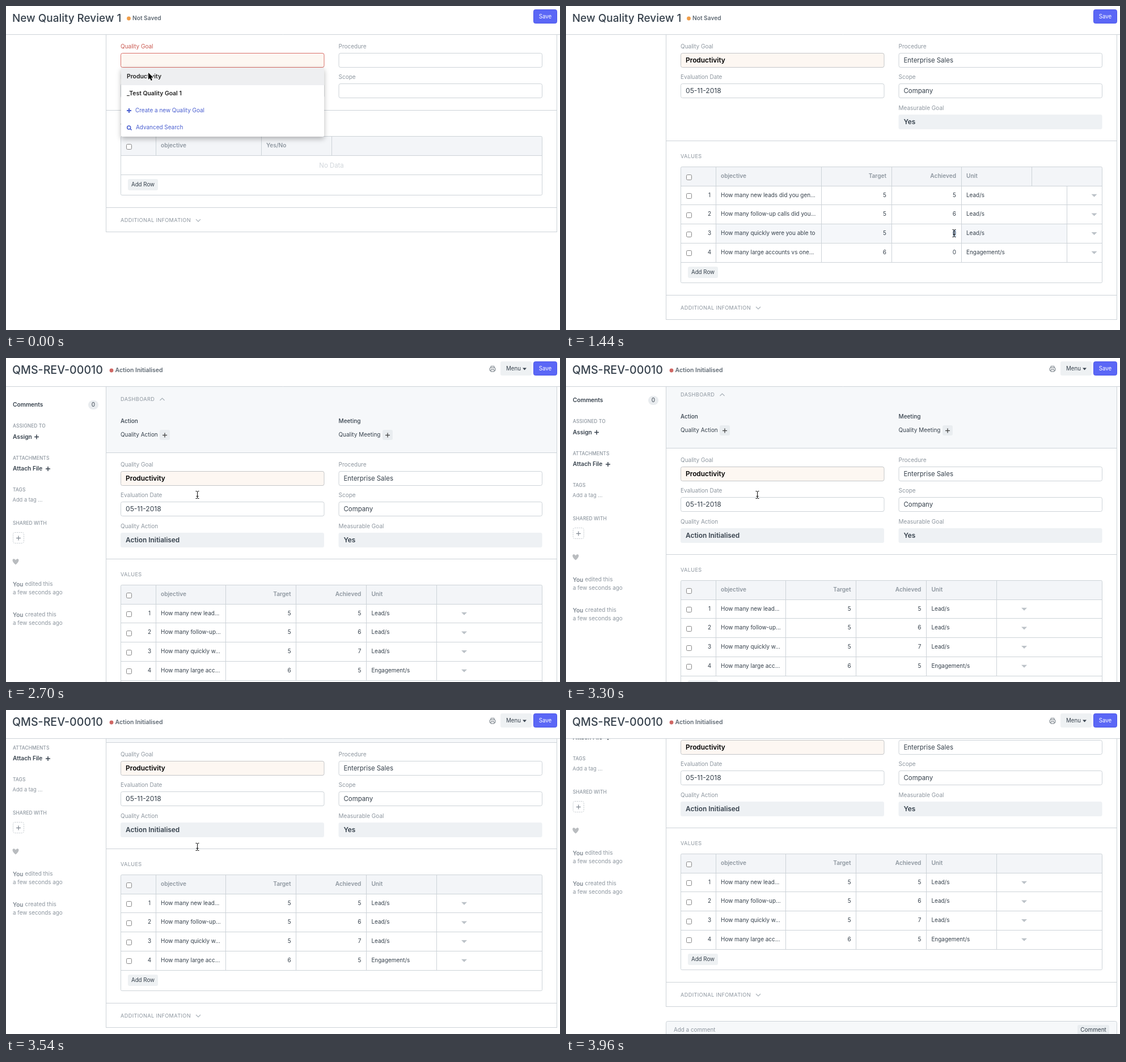
These frames come from a looping animation (977x573 px, 4.02 s). An HTML page with a canvas:

```html
<!DOCTYPE html>
<html lang="en">
<head>
<meta charset="utf-8">
<title>Quality review form</title>
<style>
  html, body { margin: 0; width: 100%; height: 100%; overflow: hidden; background: #fff; }
  canvas { display: block; }
</style>
</head>
<body>
<canvas id="stage" width="977" height="573"></canvas>
<script>
const ctx = document.getElementById('stage').getContext('2d');
const W = 977, H = 573, LOOP = 4020, STEP = 60;
const BORDER = '#cdd3d8', MUTED = '#8d969f', DARK = '#36414c', TINT = '#f3f5f8', BLUE = '#5b67f6';

// Moments when the form changes
const PICK = 120, FILL = 240, PRESS = 2220, SAVED = 2460, POINTER_GONE = 3900;

const ROWS = [
  { q: 'How many new leads did you generate', cut: [30, 17], target: 5, value: 5, unit: 'Lead/s', edit: [660, 780, 960] },
  { q: 'How many follow-up calls did you make', cut: [32, 18], target: 5, value: 6, unit: 'Lead/s', edit: [960, 1140, 1320] },
  { q: 'How many quickly were you able to', cut: [31, 18], target: 5, value: 7, unit: 'Lead/s', edit: [1380, 1560, 1680] },
  { q: 'How many large accounts vs one-off', cut: [30, 18], target: 6, value: 5, unit: 'Engagement/s', edit: [1740, 1860, 1980] },
];

// [time, x, y]
const POINTER = [
  [0, 251, 118], [120, 252, 122], [240, 262, 126], [480, 646, 316], [600, 684, 335],
  [840, 684, 335], [960, 684, 369], [1200, 684, 369], [1380, 684, 402], [1560, 684, 402],
  [1740, 684, 436], [1920, 684, 436], [2220, 956, 21], [2400, 956, 21], [2700, 337, 242],
];
// [time, offset]
const SCROLL = [
  [3120, 0], [3300, 8], [3360, 28], [3420, 58], [3480, 88],
  [3540, 110], [3600, 124], [3720, 138], [3960, 147],
];

const smooth = u => u * u * (3 - 2 * u);

function sample(keys, t, ease = u => u) {
  if (t <= keys[0][0]) return keys[0].slice(1);
  for (let i = 1; i < keys.length; i++) {
    const a = keys[i - 1], b = keys[i];
    if (t <= b[0]) {
      const u = ease((t - a[0]) / (b[0] - a[0]));
      return a.slice(1).map((v, k) => v + (b[k + 1] - v) * u);
    }
  }
  return keys[keys.length - 1].slice(1);
}

function text(s, x, y, { size = 9.95, color = DARK, weight = 400, align = 'left', spacing = 0 } = {}) {
  ctx.font = `${weight} ${size}px Inter, sans-serif`;
  ctx.letterSpacing = spacing + 'px';
  ctx.textAlign = align;
  ctx.textBaseline = 'middle';
  ctx.fillStyle = color;
  ctx.fillText(s, x, y);
}

function box(x, y, w, h, { fill, stroke, r = 0 } = {}) {
  ctx.beginPath();
  ctx.roundRect(x, y, w, h, r);
  if (fill) { ctx.fillStyle = fill; ctx.fill(); }
  if (stroke) { ctx.strokeStyle = stroke; ctx.lineWidth = 1; ctx.stroke(); }
}

function path(points, { stroke, fill, width = 1 }) {
  ctx.beginPath();
  points.forEach(([x, y], i) => i ? ctx.lineTo(x, y) : ctx.moveTo(x, y));
  if (fill) { ctx.closePath(); ctx.fillStyle = fill; ctx.fill(); }
  if (stroke) { ctx.strokeStyle = stroke; ctx.lineWidth = width; ctx.stroke(); }
}

function dot(x, y, r, color) {
  ctx.beginPath();
  ctx.arc(x, y, r, 0, 7);
  ctx.fillStyle = color;
  ctx.fill();
}

const snap = v => Math.floor(v) + 0.5;
const hline = (x1, x2, y) => path([[x1, snap(y)], [x2, snap(y)]], { stroke: BORDER });
const vline = (x, y1, y2) => path([[snap(x), y1], [snap(x), y2]], { stroke: BORDER });
const caret = (x, y, w, h, color) => path([[x - w, y - h], [x + w, y - h], [x, y + h]], { fill: color });
const chevron = (x, y, d) => path([[x - 4, y - 2 * d], [x, y + 2 * d], [x + 4, y - 2 * d]], { stroke: '#a9b1b8', width: 1.2 });
const caption = (s, y) => text(s, 202, y, { size: 9.2, color: MUTED, spacing: 0.35 });
const bold = (s, x, y, o) => text(s, x, y, { size: 10.2, weight: 600, ...o });

function plus(x, y, r, color, width) {
  path([[x - r, y], [x + r, y]], { stroke: color, width });
  path([[x, y - r], [x, y + r]], { stroke: color, width });
}

function field(x, y, label, value, { readOnly, strong, fill = '#fff', stroke = BORDER, size = 11.4, labelColor = MUTED } = {}) {
  text(label, x, y, { size: 10, color: labelColor });
  if (readOnly) box(x, y + 11, 359, 26, { fill: '#eef1f4', r: 3 });
  else box(x + 0.5, y + 11.5, 358.5, 25, { fill, stroke, r: 3 });
  const heavy = strong || readOnly;
  text(value, x + 9, y + 24.5, {
    size: heavy ? 11.9 : size, weight: heavy ? 600 : 400, color: strong ? '#000' : DARK,
  });
}

function fields(y, t) {
  const picked = t >= PICK, filled = t >= FILL, saved = t >= SAVED;
  const focused = picked && t < ROWS[0].edit[0];
  if (focused) box(201, y + 32, 362, 28, { fill: '#e6e6e6', r: 4 });
  field(202, y + 22, 'Quality Goal', picked ? 'Productivity' : '', {
    strong: true, fill: '#fdf7f2',
    stroke: picked ? '#c4c6c8' : '#d9706a', labelColor: picked ? MUTED : '#c9584f',
  });
  if (focused) {
    path([[547, y + 46], [552, y + 46]], { stroke: '#222', width: 3 });
    path([[551, y + 42], [555.5, y + 46], [551, y + 50]], { fill: '#222' });
  }
  field(586.5, y + 22, 'Procedure', filled ? 'Enterprise Sales' : '');
  field(202, y + 76, 'Evaluation Date', '05-11-2018', { size: 12.1 });
  field(586.5, y + 76, 'Scope', filled ? 'Company' : '');
  if (filled) field(586.5, y + 131, 'Measurable Goal', 'Yes', { readOnly: true });
  if (saved) field(202, y + 131, 'Quality Action', 'Action Initialised', { readOnly: true });
}

function checkbox(y) {
  box(212.5, snap(y - 4), 9, 9, { fill: '#fff', stroke: '#858585', r: 2 });
}

function row(i, y, cols, t) {
  const { q, cut, target, value, unit, edit: [start, typed, end] } = ROWS[i];
  const saved = t >= SAVED, editing = t >= start && t < end;
  const mid = y + 16.5, [c1, c2, c3, c4, c5] = cols;
  if (editing) {
    box(c1, y, c5 - c1, 33, { fill: '#f5f7fa' });
    box(c3, y, c4 - c3, 33, { fill: '#fff' });
    if (t < typed) box(682, mid - 6, 6, 12, { fill: '#cfe0f7' });
  }
  checkbox(mid + 1);
  text(i + 1, 253, mid, { align: 'center' });
  ctx.save();
  ctx.beginPath();
  ctx.rect(c1, y, c2 - c1 - 9, 33);
  ctx.clip();
  text(editing ? q : q.slice(0, cut[+saved]) + '...', c1 + 9, mid);
  ctx.restore();
  text(target, c3 - 9, mid, { align: 'right' });
  text(t >= typed ? value : 0, c4 - 9, mid, { align: 'right' });
  text(unit, c4 + 9, mid);
  caret(saved ? 808 : 931.5, mid + 0.5, 5, 2.5, '#bcc2c8');
  cols.forEach(x => vline(x, y, y + 33.7));
}

// Draws the child table and returns its bottom edge
function table(y, t) {
  const filled = t >= FILL, saved = t >= SAVED, pitch = 33.7;
  const heads = saved ? [264, 387.7, 511.6, 635.4, 759.3] : filled ? [264, 450, 574, 697, 821] : [264, 450, 574];
  const cols = saved ? heads : [264, 450, 574, 697, 883];
  const count = filled ? ROWS.length : 1;
  const bottom = y + pitch * (count + 1) + 36;
  const head = { size: 10.1, color: MUTED };
  box(203, y, 742, pitch, { fill: TINT });
  checkbox(y + 17.5);
  heads.forEach(x => vline(x, y, y + pitch));
  bold('objective', 273, y + 16.5, head);
  if (filled) {
    bold('Target', heads[2] - 9, y + 16.5, { ...head, align: 'right' });
    bold('Achieved', heads[3] - 9, y + 16.5, { ...head, align: 'right' });
    bold('Unit', heads[3] + 9, y + 16.5, head);
    ROWS.forEach((_, i) => row(i, y + pitch * (i + 1), cols, t));
  } else {
    bold('Yes/No', 459, y + 16.5, head);
    text('No Data', 574, y + pitch * 1.5 + 1, { size: 11.4, color: '#d1d6db', align: 'center' });
  }
  for (let i = 1; i <= count + 1; i++) hline(203, 945, y + pitch * i);
  box(215, Math.round(bottom - 28), 53, 20, { fill: '#eef1f3', r: 3 });
  text('Add Row', 241.5, bottom - 17.7, { size: 9.75, align: 'center' });
  box(202.5, snap(y), 743, snap(bottom) - snap(y), { stroke: BORDER, r: 2 });
  return bottom;
}

function dashboard(y) {
  box(177, y - 117, 794, 117, { fill: '#f6f8fa' });
  hline(177, 971, y);
  caption('DASHBOARD', y - 94);
  chevron(275.5, y - 94, -1);
  [['Action', 202, 280], ['Meeting', 586.5, 673]].forEach(([name, x, px]) => {
    text(name, x, y - 55.5, { size: 10, weight: 500 });
    text('Quality ' + name, x, y - 31);
    box(px - 9, y - 40, 18, 18, { fill: '#e9edf0', r: 3 });
    plus(px, y - 30.5, 4, '#444', 1.3);
  });
}

function sidebar(dy) {
  ctx.save();
  ctx.translate(0, -dy);
  const small = (s, y) => text(s, 12, y, { size: 8.4, weight: 500, color: MUTED, spacing: 0.1 });
  bold('Comments', 12, 83);
  box(145, 75, 18, 16, { fill: '#e9ecef', r: 8 });
  text('0', 154, 83.5, { align: 'center' });
  small('ASSIGNED TO', 120.5);
  bold('Assign', 12, 139.5);
  plus(54, 139.5, 4, DARK, 1.5);
  small('ATTACHMENTS', 177);
  bold('Attach File', 12, 196);
  plus(74, 196, 4, DARK, 1.5);
  small('TAGS', 233.5);
  text('Add a tag ...', 11.5, 251, { size: 9.3, color: MUTED });
  small('SHARED WITH', 292.5);
  ctx.setLineDash([2, 1.5]);
  box(12.5, 308.5, 19, 19, { stroke: '#c3c9ce', r: 3 });
  ctx.setLineDash([]);
  plus(22, 318.5, 4, '#7d868f', 1.2);
  ctx.beginPath();
  ctx.moveTo(17, 365.5);
  ctx.bezierCurveTo(7, 358, 13, 352, 17, 357.5);
  ctx.bezierCurveTo(21, 352, 27, 358, 17, 365.5);
  ctx.fillStyle = '#b9bcbf';
  ctx.fill();
  [['edited', 400.5], ['created', 454.5]].forEach(([verb, y]) => {
    bold('You', 12, y, { size: 10, color: '#7d868f' });
    text(verb + ' this', 33.5, y, { color: MUTED });
    text('a few seconds ago', 12, y + 14.5, { color: MUTED, size: 9.85 });
  });
  ctx.restore();
}

function dropdown() {
  ctx.save();
  ctx.shadowColor = 'rgba(0,0,0,.28)';
  ctx.shadowBlur = 10;
  ctx.shadowOffsetY = 4;
  box(203, 109, 358, 122, { fill: '#fff', r: 2 });
  ctx.restore();
  box(203, 109, 358, 31, { fill: '#eeeff1' });
  bold('Productivity', 213, 124.5, { size: 10.4, color: '#222' });
  bold('_Test Quality Goal 1', 213, 155, { size: 10.4, color: '#222' });
  const link = '#4a5fd0';
  plus(217, 185, 4, link, 2);
  text('Create a new Quality Goal', 228, 185, { color: link });
  ctx.beginPath();
  ctx.arc(216.7, 215, 3, 0, 7);
  ctx.strokeStyle = link;
  ctx.lineWidth = 1.5;
  ctx.stroke();
  path([[219, 217], [221.5, 219.5]], { stroke: link, width: 1.7 });
  text('Advanced Search', 229, 215.5, { color: link });
}

function header(t) {
  const saved = t >= SAVED;
  box(0, 0, W, 50, { fill: '#fff' });
  hline(0, W, 50);
  const title = saved ? 'QMS-REV-00010' : 'New Quality Review 1';
  text(title, 11, 22.5, { size: saved ? 19.6 : 18.9, weight: 500 });
  const x = saved ? 186 : 216.5;
  dot(x, 22, 3.4, saved ? '#cf6663' : '#f09d49');
  bold(saved ? 'Action Initialised' : 'Not Saved', x + 6.5, 22, { size: saved ? 10.5 : 10.2, color: '#5f6973' });
  const pressed = t >= PRESS && t < SAVED;
  box(930.5, 6.5, 41, 24, { fill: pressed ? '#8990f2' : BLUE, stroke: pressed ? '#7d84ee' : '#4c57ea', r: 3 });
  text('Save', 951, 19, { size: 9.75, color: pressed ? '#d5d8fb' : '#fff', align: 'center' });
  if (!saved) return;
  box(872, 6, 55, 25, { fill: '#eef1f3', r: 3 });
  text('Menu', 882, 19, { size: 9.75 });
  caret(914.5, 19.5, 3.5, 2, DARK);
  const ink = '#6f7880';
  box(853, 17.5, 10, 5, { stroke: ink, r: 1 });
  box(855, 14.5, 6, 3, { stroke: ink });
  box(855, 20.5, 6, 3.5, { fill: '#fff', stroke: ink });
}

function pointer(t) {
  const [x, y] = sample(POINTER, t, smooth);
  ctx.save();
  if ((t >= 600 && t <= 1980) || t >= 2640) {
    ctx.translate(snap(x), Math.round(y));
    path([[0, -5], [0, 5]], { stroke: '#111' });
    for (const side of [1, -1]) {
      path([[-3, 6.5 * side], [-1, 6.5 * side], [0, 5 * side], [1, 6.5 * side], [3, 6.5 * side]], { stroke: '#111' });
    }
    path([[-2, 2.5], [2, 2.5]], { stroke: '#111' });
  } else {
    ctx.translate(x, y);
    const arrow = [[0, 0], [0, 12], [2.8, 9.4], [4.8, 14], [6.9, 13.1], [5, 8.6], [8.6, 8.5], [0, 0]];
    path(arrow, { stroke: '#fff', width: 2 });
    path(arrow, { fill: '#000' });
  }
  ctx.restore();
}

function draw(t) {
  const saved = t >= SAVED;
  const scroll = Math.round(sample(SCROLL, t)[0]);
  const top = saved ? 167 - scroll : 50;
  box(0, 0, W, H, { fill: '#fff' });
  if (saved) {
    sidebar(scroll);
    dashboard(top);
  }
  fields(top, t);
  const values = top + (t >= FILL ? 188.5 : 134.7);
  hline(177, 971, values);
  caption('VALUES', values + 27.5);
  const extra = table(values + 46, t) + 22;
  hline(177, 971, extra);
  caption('ADDITIONAL INFOMATION', extra + 23);
  chevron(339, extra + 23, 1);
  const end = extra + 43;
  hline(176, 972, end);
  vline(176, 50, end);
  vline(971, 50, end);
  if (saved) {
    box(176.5, snap(end + 26), 795, 80, { fill: '#f6f8fa', stroke: BORDER, r: 3 });
    text('Add a comment', 190, end + 42, { color: MUTED, size: 9.85 });
    box(902, end + 33, 56, 20, { fill: '#e9edf0', r: 3 });
    text('Comment', 930, end + 42, { align: 'center' });
  }
  if (t < PICK) dropdown();
  header(t);
  if (t < POINTER_GONE) pointer(t);
}

function tick() {
  const t = performance.now() % LOOP;
  draw(Math.floor(t / STEP) * STEP);
  requestAnimationFrame(tick);
}
tick();
</script>
</body>
</html>
```
